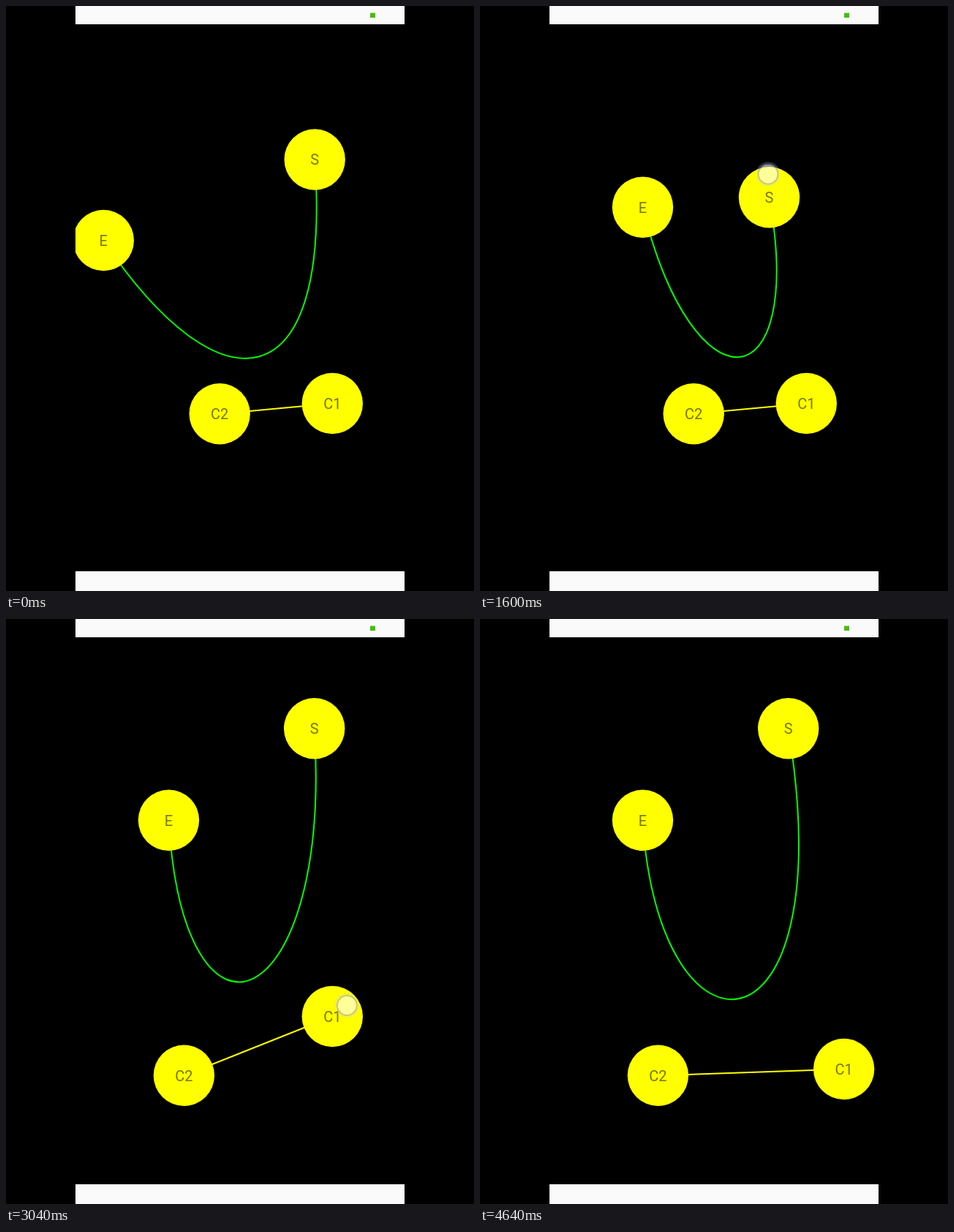
These frames come from a looping animation (640 px wide and 800 px high, 4720 ms). An HTML page:

```html
<!DOCTYPE html>
<html lang="en">
<head>
<meta charset="utf-8">
<title>Cubic curve handles</title>
<style>
  html, body { margin: 0; width: 100%; height: 100%; overflow: hidden; background: #000; }
  svg { display: block; width: 640px; height: 800px; }
  text { font: 20px Roboto, Arial, sans-serif; text-anchor: middle; fill: #000; fill-opacity: .54; }
  .node circle { fill: #ff0; }
  .bar { fill: #fafafa; }
  .line { fill: none; stroke-width: 2; }
</style>
</head>
<body>
<svg viewBox="0 0 640 800">
  <defs>
    <clipPath id="screen"><rect x="95" y="25" width="450" height="748"/></clipPath>
    <radialGradient id="glow">
      <stop offset=".76" stop-color="#c8c4ff" stop-opacity="0"/>
      <stop offset=".77" stop-color="#c8c4ff" stop-opacity=".4"/>
      <stop offset="1" stop-color="#c8c4ff" stop-opacity="0"/>
    </radialGradient>
  </defs>
  <rect width="640" height="800"/>
  <rect class="bar" x="95" width="450" height="25"/>
  <rect class="bar" x="95" y="773" width="450" height="27"/>
  <rect x="498" y="9.5" width="7" height="6.5" fill="#46be06"/>
  <g clip-path="url(#screen)">
    <path id="curve" class="line" stroke="#0f0"/>
    <path id="link" class="line" stroke="#ff0"/>
    <g id="nodes"></g>
    <g id="touch">
      <circle r="18" fill="url(#glow)"/>
      <circle r="13.3" fill="#fff" fill-opacity=".6" stroke="#888" stroke-opacity=".45" stroke-width="1.8"/>
    </g>
  </g>
</svg>
<script>
const LOOP = 4720, STEP = 80, LEAD = 25;

// touch: finger down and lifting; move: time span of the path, evenly split over its points;
// grip: finger offset from the handle, which shifts by slide during the move
const drags = [
  { name: "E", touch: [640, 1120], move: [720, 1120], grip: [21.5, -9],
    path: [[133.3, 320.5], [176, 285], [222.5, 275.3]] },
  { name: "S", touch: [1280, 1840], move: [1360, 1720], grip: [-5, -15],
    path: [[422.2, 210], [406, 243], [395.5, 261.8], [421.7, 149.8]] },
  { name: "C2", touch: [2000, 2720], move: [2000, 2640], grip: [32, -19],
    path: [[292.2, 557.7], [218, 610], [146.7, 672], [165, 662], [243.4, 624.3]] },
  { name: "C1", touch: [2880, 4000], move: [3200, 3920], grip: [20, -15], slide: [-1, 16],
    path: [[446.3, 543.5], [480, 572], [488, 600], [474, 621],
           [455.4, 648], [470, 677], [497.6, 615.5]] }
];

const $ = id => document.getElementById(id);
const curve = $("curve"), link = $("link"), touch = $("touch"), nodes = {};

for (const { name } of drags) {
  $("nodes").insertAdjacentHTML("beforeend",
    `<g class="node"><circle r="41.7"/><text y="7.3">${name}</text></g>`);
  nodes[name] = $("nodes").lastElementChild;
}

const progress = ({ move: [from, to] }, t) =>
  Math.min(1, Math.max(0, (t - from) / (to - from)));

// Catmull-Rom spline through the points of the path
function handleAt(drag, t) {
  const { path } = drag, last = path.length - 1;
  const s = progress(drag, t) * last, i = Math.min(Math.floor(s), last - 1), u = s - i;
  const point = k => path[Math.min(last, Math.max(0, k))];
  return [0, 1].map(axis => {
    const [a, b, c, d] = [-1, 0, 1, 2].map(k => point(i + k)[axis]);
    return b + u / 2 * (c - a + u * (2 * a - 5 * b + 4 * c - d + u * (3 * (b - c) + d - a)));
  });
}

// The handle trails the finger by a moment
function fingerAt(drag, t) {
  const { grip, slide = [0, 0] } = drag, p = progress(drag, t);
  return handleAt(drag, t + LEAD).map((v, axis) => v + grip[axis] + slide[axis] * p);
}

const place = (el, [x, y]) => el.setAttribute("transform", `translate(${x} ${y})`);

function draw(ms) {
  const t = Math.floor((ms % LOOP) / STEP) * STEP, pos = {};
  for (const drag of drags) {
    pos[drag.name] = handleAt(drag, t);
    place(nodes[drag.name], pos[drag.name]);
  }
  curve.setAttribute("d", `M${pos.S}C${pos.C1} ${pos.C2} ${pos.E}`);
  link.setAttribute("d", `M${pos.C1}L${pos.C2}`);

  const held = drags.find(({ touch: [down, up] }) => t >= down && t <= up);
  touch.setAttribute("opacity", !held ? 0 : t === held.touch[1] ? .7 : 1);
  if (held) place(touch, fingerAt(held, t));
}

const start = performance.now();
function tick() {
  draw(performance.now() - start);
  requestAnimationFrame(tick);
}
tick();
</script>
</body>
</html>
```
